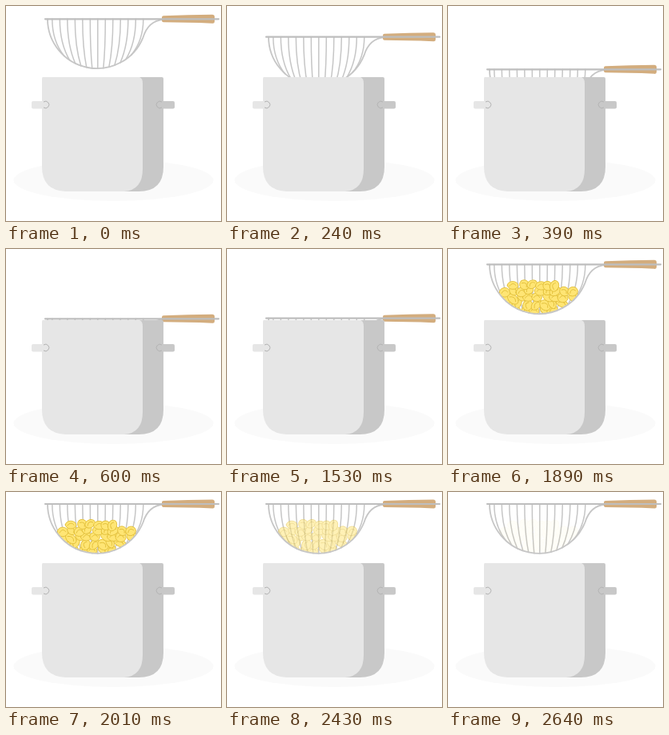
Write an HTML page that moves like this. It is 269 by 269 pixels and loops after 2730 ms.

```html
<!DOCTYPE html>
<html lang="en">
<head>
<meta charset="utf-8">
<title>Deep fryer</title>
<style>
  html, body { margin: 0; width: 100%; height: 100%; overflow: hidden; background: #fff; }
  svg { display: block; width: 100%; height: 100%; }
</style>
</head>
<body>
<svg viewBox="0 0 269 269">
  <defs>
    <clipPath id="bowl"><circle cx="114" r="62"/></clipPath>
  </defs>
  <ellipse cx="134.500" cy="218" rx="125" ry="26" fill="#fafafa"/>

  <!-- basket: the rim lies on y = 0 -->
  <g id="basket" fill="none" stroke="#c6c6c6" stroke-linecap="round">
    <g id="wires" stroke-width="1.5"></g>
    <g id="food" clip-path="url(#bowl)" fill="#ffe574" stroke="#e2c03c" stroke-width=".9"></g>
    <path d="M52 0A62 62 0 0 0 171.500 23Q178 2 197 .5" stroke-width="1.8"/>
    <path d="M197-4Q228-5.500 258-5.500Q261-5.500 261-2.500V3Q261 6 258 5.500Q226 4 197 4Q195 4 195 2V-2Q195-4 197-4Z" fill="#d3ad7e" stroke="none"/>
    <path d="M49 0H266" stroke="#bebebe" stroke-width="2.200"/>
  </g>

  <!-- pot -->
  <rect x="32" y="119" width="20" height="9.500" rx="2" fill="#e6e6e6"/>
  <rect x="190" y="119" width="21" height="9.500" rx="2" fill="#c8c8c8"/>
  <path d="M160 89H195Q197 89 197 91V201Q197 232 166 232H140Z" fill="#c8c8c8"/>
  <path d="M46 89H167Q171 90 171 97V204Q171 230 148 232H75Q45 231 45 201V91Q45 89 46 89Z" fill="#e6e6e6"/>
  <g stroke="#b4b4b4">
    <path d="M47 120A4.300 4.300 0 1 1 47 127" fill="#e6e6e6"/>
    <path d="M195 120A4.300 4.300 0 1 0 195 127" fill="#c8c8c8"/>
  </g>
</svg>
<script>
const LOOP = 2730, STEP = 30;
const CENTER = 114, RADIUS = 62;
const basket = document.getElementById('basket');
const food = document.getElementById('food');
const wires = document.getElementById('wires');

function addPath(parent, d, attributes = {}) {
  const path = document.createElementNS('http://www.w3.org/2000/svg', 'path');
  path.setAttribute('d', d);
  for (const name in attributes) path.setAttribute(name, attributes[name]);
  parent.append(path);
}

// Wires hang from the rim and bend towards the middle of the bowl.
for (let i = -6; i <= 6; i++) {
  const top = CENTER + 0.8 + i * 9.5;
  const foot = CENTER + 0.8 + i * 7;
  const depth = Math.sqrt(RADIUS ** 2 - (foot - CENTER) ** 2);
  addPath(wires, `M${top} 0Q${top} ${depth * 0.6} ${foot} ${depth}`);
}

let seed = 11;
const random = () => (seed = seed * 16807 % 2147483647) / 2147483647;

// Heaped crisps, laid in rows from the bottom up.
for (let row = 0; row < 5; row++) {
  const half = [26, 36, 43, 42, 31][row];
  for (let x = -half; x <= half; x += 10.5) {
    const cx = CENTER + x + random() * 5 - 2.5;
    const cy = 57 - row * 7.8 + random() * 4 - 2;
    const rx = 6 + random() * 2, ry = 4.6 + random() * 1.4;
    const transform = `translate(${cx} ${cy}) rotate(${random() * 140 - 70})`;
    addPath(food, `M${-rx} 0A${rx} ${ry} 0 1 1 ${rx} 0A${rx} ${ry} 0 1 1 ${-rx} 0Z`, { transform });
    addPath(food, `M${-rx * 0.6} 1Q0 ${-ry} ${rx * 0.6} 0`, { transform, fill: 'none' });
  }
}

const progress = (t, start, length) => Math.min(1, Math.max(0, (t - start) / length));
const easeInOut = (u, power) =>
  u < 0.5 ? (2 * u) ** power / 2 : 1 - (2 - 2 * u) ** power / 2;

function draw(now) {
  const t = Math.floor((now % LOOP) / STEP) * STEP;
  const y = t < 1500
    ? 16.3 + 71 * easeInOut(progress(t, 0, 560), 3)
    : 87.3 - 72.3 * easeInOut(progress(t, 1500, 472), 2);
  basket.setAttribute('transform', `translate(0 ${y})`);
  food.setAttribute('opacity', t < 1500 ? 0 : 1 - progress(t, 2220, 440));
  requestAnimationFrame(time => draw(Math.max(0, time - origin)));
}

const origin = performance.now();
draw(0);
</script>
</body>
</html>
```
